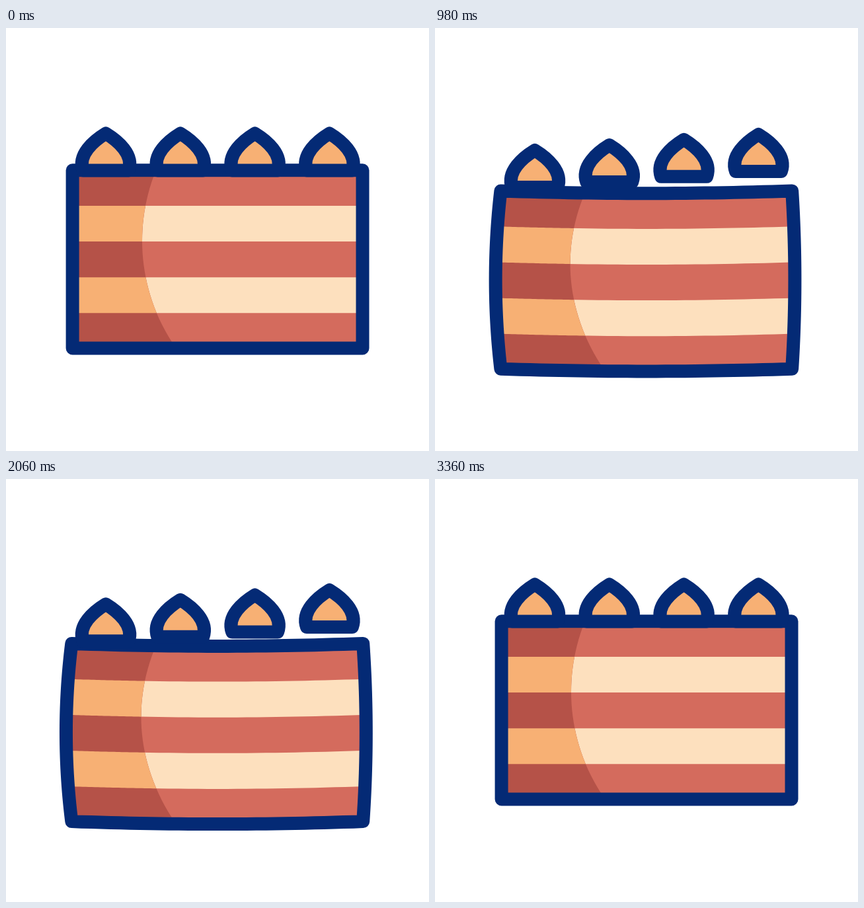
These frames come from a looping animation (640 px wide and 640 px high, 3520 ms). An HTML page with a canvas:

```html
<!DOCTYPE html>
<html lang="en">
<head>
<meta charset="utf-8">
<title>Bouncing cake</title>
<style>
html, body { margin: 0; width: 100%; height: 100%; overflow: hidden; background: #fff; }
canvas { display: block; width: 640px; height: 640px; }
</style>
</head>
<body>
<canvas id="stage" width="640" height="640"></canvas>
<script>
const ctx = document.getElementById('stage').getContext('2d');
const LOOP = 3520, STEP = 20;
const NAVY = '#042a75', RED = '#d46b5d', CREAM = '#fde0be', DARK = '#b55248', ORANGE = '#f7b074';
const BOX = { l: 100.6, r: 539.5, t: 215.3, b: 484.5 };
const CX = (BOX.l + BOX.r) / 2, CY = (BOX.t + BOX.b) / 2;
const HALF_W = 229.3, HALF_H = 144.6;
const STRIPE = 54.1, LAG = 30, FLAME_COUNT = 4;

// turning points of the bounce: cake height, and how far flames fly above it
const BEATS = [
  { t: 220, lift: 0, toss: 0 },
  { t: 600, lift: -31, toss: 47 },
  { t: 1088, lift: 39, toss: 0 },
  { t: 1590, lift: -51, toss: 46 },
  { t: 2160, lift: 40, toss: 0 },
  { t: 2620, lift: 0, toss: 37 },
  { t: 2780, lift: 0, toss: 0 },
  { t: 3030, lift: -28, toss: 39 },
  { t: 3270, lift: 0, toss: 0 }
];
const SQUASHES = BEATS.filter(b => b.lift > 0);

function ease(t, value) {
  const next = BEATS.findIndex(b => t < b.t);
  if (next <= 0) return 0;
  const a = BEATS[next - 1], b = BEATS[next];
  const k = (1 - Math.cos(Math.PI * (t - a.t) / (b.t - a.t))) / 2;
  return value(a) + (value(b) - value(a)) * k;
}

let lift = 0, bow = 0, arch = 0;

const sag = x => lift + arch * (1 - ((x - CX) / HALF_W) ** 2);

function warp(x, y) {
  const u = (x - CX) / HALF_W, v = (y - CY) / HALF_H;
  const side = u < 0 ? bow : -bow * (bow < 0 ? 0.55 : 0.85);
  const reach = Math.min(1, Math.abs(u / 0.91) ** 3);
  return [x + side * reach * (1 - v * v), y + sag(x)];
}

const shadeEdge = y => {
  const R = 283, d = y - 322;
  return 206 + R - Math.sqrt(R * R - d * d);
};
const rightEdge = () => BOX.r;

// closed shape from the cake's left side to the given edge, bent by warp
function trace(top, bottom, edge) {
  const n = 30, mix = (a, b, i) => a + (b - a) * i / n;
  const sides = [
    i => [mix(BOX.l, edge(top), i), top],
    i => [edge(mix(top, bottom, i)), mix(top, bottom, i)],
    i => [mix(edge(bottom), BOX.l, i), bottom],
    i => [BOX.l, mix(bottom, top, i)]
  ];
  ctx.beginPath();
  for (const side of sides) {
    for (let i = 0; i < n; i++) ctx.lineTo(...warp(...side(i)));
  }
  ctx.closePath();
}

function fill(color, top, bottom, edge) {
  trace(top, bottom, edge);
  ctx.fillStyle = color;
  ctx.fill();
}

function layers(base, band, edge) {
  fill(base, BOX.t, BOX.b, edge);
  for (const row of [0, 2]) {
    const y = 269 + row * STRIPE;
    fill(band, y, y + STRIPE, edge);
  }
}

function outline() {
  ctx.strokeStyle = NAVY;
  ctx.lineWidth = 20;
  ctx.lineJoin = 'round';
  ctx.stroke();
}

function cake() {
  layers(RED, CREAM, rightEdge);
  layers(DARK, ORANGE, shadeEdge);
  trace(BOX.t, BOX.b, rightEdge);
  outline();
}

function flame(x, dy, deg) {
  ctx.save();
  ctx.translate(x, 187.5 + dy);
  ctx.rotate(deg * Math.PI / 180);
  ctx.beginPath();
  ctx.moveTo(0, -28);
  ctx.bezierCurveTo(-18, -17, -43, 4, -34.5, 28);
  ctx.lineTo(34.5, 28);
  ctx.bezierCurveTo(43, 4, 18, -17, 0, -28);
  ctx.closePath();
  ctx.fillStyle = ORANGE;
  ctx.fill();
  outline();
  ctx.restore();
}

// flames lean one way in flight and kick the other way just after a squash
function tilt(t, dy) {
  const lean = -3 * Math.min(1, Math.max(0, -dy / 35));
  return SQUASHES.reduce((sum, s) => sum + 4.5 * Math.exp(-(((t - s.t - 255) / 90) ** 2)), lean);
}

function draw(t) {
  lift = ease(t, b => b.lift);
  bow = lift < 0 ? 4 * Math.min(1, -lift / 26) : -0.29 * lift;
  arch = bow * (bow > 0 ? -1.5 : -0.45);
  ctx.fillStyle = '#fff';
  ctx.fillRect(0, 0, 640, 640);
  cake();
  for (let i = 0; i < FLAME_COUNT; i++) {
    const x = 151 + 112.8 * i;
    const hop = ease(t - LAG * i, b => b.lift - b.toss * (1 - 0.026 * i * i));
    const dy = Math.min(hop, sag(x));
    flame(x, dy, tilt(t, dy) * (i % 2 ? -1 : 1));
  }
}

function tick() {
  const t = performance.now() % LOOP;
  draw(Math.floor(t / STEP) * STEP);
  requestAnimationFrame(tick);
}
tick();
</script>
</body>
</html>
```
